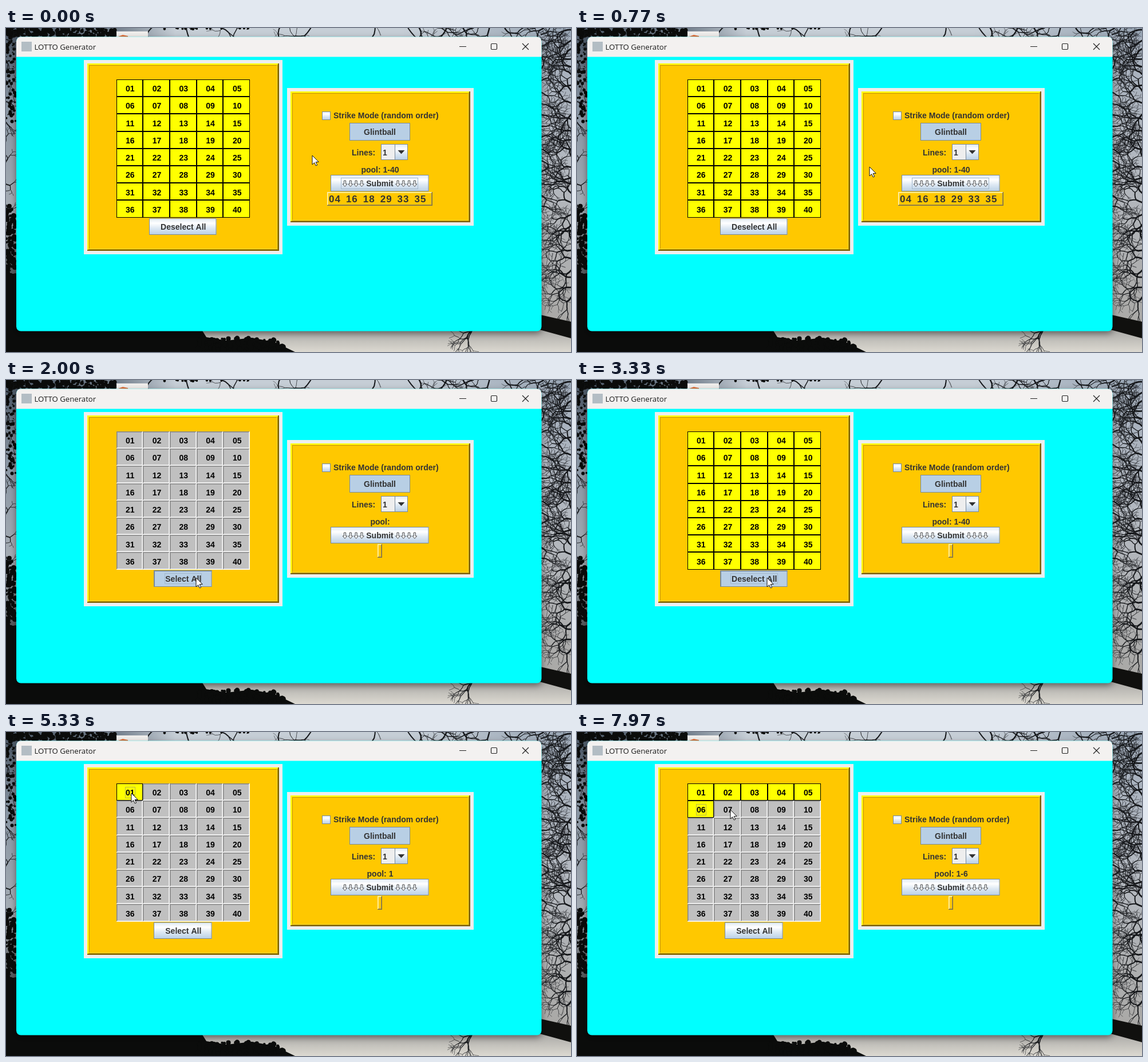
Recreate the animation shown at these times as an HTML page with a canvas. Size 987 by 567 pixels, loop 8000 ms.

```html
<!DOCTYPE html>
<html lang="en">
<head>
<meta charset="utf-8">
<title>LOTTO Generator</title>
<style>
html, body { margin: 0; width: 100%; height: 100%; overflow: hidden; background: #000; }
canvas { display: block; }
</style>
</head>
<body>
<canvas id="stage" width="987" height="567"></canvas>
<script>
const W = 987, H = 567, LOOP = 8000;
const BOLD = 'bold 14px "Liberation Sans", Arial, sans-serif';
const ORANGE = '#ffc800', BLUE = '#b8cfe5', STEEL = '#7a8a99', INK = '#333';
const screen = document.getElementById('stage').getContext('2d');
let ctx = screen;

function box(x, y, w, h, fill, stroke) {
  if (fill) { ctx.fillStyle = fill; ctx.fillRect(x, y, w, h); }
  if (stroke) { ctx.strokeStyle = stroke; ctx.lineWidth = 1; ctx.strokeRect(x + .5, y + .5, w - 1, h - 1); }
}

function text(str, x, y, align = 'center', color = INK, font = BOLD) {
  ctx.font = font;
  ctx.textAlign = align;
  ctx.fillStyle = color;
  ctx.fillText(str, x, y);
}

function path(points, fill, stroke, width = 1, close = true) {
  ctx.beginPath();
  points.forEach(([x, y]) => ctx.lineTo(x, y));
  if (close) ctx.closePath();
  if (fill) { ctx.fillStyle = fill; ctx.fill(); }
  if (stroke) { ctx.strokeStyle = stroke; ctx.lineWidth = width; ctx.stroke(); }
}

function bevel(x, y, w, h, light, dark, size = 1) {
  box(x, y, w, size, light);
  box(x, y, size, h, light);
  box(x, y + h - size, w, size, dark);
  box(x + w - size, y, size, h, dark);
}

function gradient(x, y, w, h, stops) {
  const g = ctx.createLinearGradient(x, y, x + w, y + h);
  stops.forEach(([p, c]) => g.addColorStop(p, c));
  return g;
}

const metal = (y, h) => gradient(0, y, 0, h, [[0, '#dde8f3'], [.3, '#fff'], [.6, '#dde8f3'], [1, BLUE]]);

function button(x, y, w, h, pressed) {
  box(x, y, w, h, pressed ? BLUE : metal(y, h), STEEL);
  if (pressed) { box(x, y, 2, h, STEEL); box(x, y, w, 2, STEEL); }
}

function panel(x, y, w, h) {
  box(x, y, w, h, '#eee');
  box(x + 6, y + 6, w - 12, h - 12, ORANGE);
  bevel(x + 6, y + 6, w - 12, h - 12, '#ffff00', '#7c6200', 2);
  bevel(x + 8, y + 8, w - 16, h - 16, '#ffd800', '#b28c00');
  bevel(x + 9, y + 9, w - 18, h - 18, '#c89a00', '#ffdc30');
}

// Backdrop: evening sky with seeded tree silhouettes
let seed = 11;
const rand = () => (seed = (seed * 16807) % 2147483647) / 2147483647;

function branch(x, y, angle, length, width) {
  if (width < .45) return;
  ctx.strokeStyle = '#15171a';
  ctx.lineWidth = width;
  ctx.beginPath();
  ctx.moveTo(x, y);
  for (let i = 0; i < 3; i++) {
    angle += (rand() - .5) * .9;
    x += Math.cos(angle) * length / 3;
    y += Math.sin(angle) * length / 3;
    ctx.lineTo(x, y);
  }
  ctx.stroke();
  for (const side of [-1, 1]) branch(x, y, angle + side * (.2 + rand() * .7), length * .85, width * .7);
}

function foliage(count, x, y, w, h, size) {
  ctx.fillStyle = '#0b0c0b';
  for (let i = 0; i < count; i++) {
    ctx.beginPath();
    ctx.arc(x + rand() * w, y + rand() * h, size * (.3 + rand()), 0, 7);
    ctx.fill();
  }
}

function drawBackdrop() {
  box(0, 0, W, H, gradient(0, 0, 0, H, [[0, '#a4afbd'], [.45, '#b4b9c0'], [.93, '#a9a8a5'], [1, '#dcd9d1']]));
  box(0, 0, W, 16, gradient(0, 0, W, 0, [[0, '#4d5967'], [.2, '#76828f'], [.3, '#c6ced6'], [.7, '#c6ced6'], [1, '#98a5b4']]));
  box(0, 16, 20, 414, gradient(0, 16, 0, 414, [[0, '#4d5967'], [.3, '#8794a2'], [.7, '#a3abb3'], [1, '#55595c']]));
  foliage(190, 0, 0, 192, 15, 3.5);
  foliage(70, 0, 0, 17, 170, 3);
  foliage(110, 0, 310, 17, 125, 4);
  foliage(24, 265, 0, 170, 2, 2);
  for (let i = 0; i < 9; i++) branch(260 + i * 55, -4, rand() * 3, 22, 2);
  for (let i = 0; i < 10; i++) branch(720 + i * 25, -3, rand() * 3, 16, 2.4);
  for (let i = 0; i < 30; i++) branch(991, 4 + i * 16, 2.5 + rand() * 1.4, 16, 2.8);
  for (let i = 0; i < 16; i++) branch(934, 12 + i * 20, -.7 + rand() * 1.4, 14, 2);
  for (let i = 0; i < 9; i++) branch(-1, 20 + i * 36, rand() * 2 - 1, 9, 1.8);
  for (let i = 0; i < 4; i++) branch(815, 528, 2.2 + i * .25, 17, 1.6);
  box(0, 430, 20, 137, '#0b0c0b');
  path([[0, 525], [340, 525], [350, 541], [385, 547], [430, 542], [470, 550], [505, 567], [0, 567]], '#0b0c0b');
  foliage(130, 335, 543, 155, 24, 4);
  path([[925, 500], [987, 514], [987, 543], [925, 526]], '#10100e');
  box(193, 6, 55, 12, '#f1efed');
  path([[196, 15], [204, 12], [213, 14], [213, 16]], '#e2703a');
}

function drawWindow() {
  ctx.save();
  ctx.shadowColor = 'rgba(0,0,0,.45)';
  ctx.shadowBlur = 12;
  ctx.shadowOffsetY = 4;
  ctx.beginPath();
  ctx.roundRect(18, 15.5, 917.5, 515, 8);
  ctx.fillStyle = '#0ff';
  ctx.fill();
  ctx.restore();
  ctx.beginPath();
  ctx.roundRect(18, 15.5, 917.5, 35, [8, 8, 0, 0]);
  ctx.fillStyle = '#f3f1f0';
  ctx.fill();
  box(27, 24, 18, 17, '#b3bdc4');
  text('LOTTO Generator', 49.5, 38, 'left', '#1c1c1c', '13.2px "Open Sans", "Noto Sans", sans-serif');
  path([[792, 32.5], [804, 32.5]], null, '#222', 1.2);
  ctx.beginPath();
  ctx.roundRect(847.5, 27.5, 10, 10, 1.5);
  ctx.stroke();
  path([[902, 27], [913, 38]], null, '#222', 1.2);
  path([[913, 27], [902, 38]], null, '#222', 1.2);
}

function downArrow(x, y) {
  const half = [[1.5, 0], [1.5, 6], [4, 6], [0, 10.5]];
  const mirrored = half.slice(0, 3).reverse().map(([a, b]) => [-a, b]);
  path([...half, ...mirrored].map(([a, b]) => [x + a, y + b]), '#f4f7fa', '#4c4c4c');
}

function drawControls() {
  panel(136, 56, 347, 340);
  panel(491, 105, 326, 241);
  box(552, 146, 15, 15, metal(146, 15), STEEL);
  text('Strike Mode (random order)', 572, 158, 'left');
  box(600, 166, 106, 31, BLUE, STEEL);
  text('Glintball', 653, 187);
  text('Lines:', 604, 223, 'left');
  box(655, 203, 25, 28, '#eee', STEEL);
  button(679, 203, 23, 28);
  text('1', 658, 223, 'left');
  path([[684.5, 214], [696.5, 214], [690.5, 220.5]], INK);
  button(567, 257, 171.5, 29);
  text('Submit', 653, 277);
  for (let i = 0; i < 4; i++) {
    downArrow(592 + i * 9.8, 267);
    downArrow(684.5 + i * 9.8, 267);
  }
}

function layer(draw) {
  const canvas = document.createElement('canvas');
  canvas.width = W;
  canvas.height = H;
  ctx = canvas.getContext('2d');
  draw();
  ctx = screen;
  return canvas;
}

const still = layer(() => { drawBackdrop(); drawWindow(); drawControls(); });

// Timeline: button presses [down, up], number clicks, pointer stops [time, x, y]
const presses = [[1650, 1770], [1930, 2090], [3260, 3410]];
const picks = [5250, 5650, 6080, 6560, 6930, 7560];
const pointer = [
  [0, 535, 223], [250, 535, 223], [770, 511, 243], [1500, 332, 346], [3950, 332, 346],
  [4270, 324, 324], [5050, 216, 108], [5300, 217, 107], [5550, 262, 106], [5720, 262, 106],
  [5980, 309, 105], [6150, 310, 105], [6370, 345, 105], [6480, 355, 106], [6640, 356, 106],
  [6850, 401, 107], [7020, 401, 107], [7430, 215, 136], [7650, 216, 136], [7970, 268, 136], [8000, 268, 136]
];

function pointerAt(t) {
  const i = pointer.findIndex(p => p[0] > t);
  const [t0, x0, y0] = pointer[i - 1], [t1, x1, y1] = pointer[i];
  const p = (t - t0) / (t1 - t0), e = p * p * (3 - 2 * p);
  return [x0 + (x1 - x0) * e, y0 + (y1 - y0) * e];
}

const cellX = col => Math.round(192.8 + col * 46.65);
const cellY = row => Math.round(90 + row * 30.2);

function drawCell(index, selected, focused) {
  const col = index % 5, row = Math.floor(index / 5);
  const x = cellX(col), y = cellY(row), w = cellX(col + 1) - x, h = cellY(row + 1) - y;
  if (selected) {
    box(x, y, w, h, '#ff0', '#000');
  } else {
    box(x, y, w, h, '#c0c0c0');
    bevel(x, y, w, h, '#858585', '#fff');
    bevel(x + 1, y + 1, w - 2, h - 2, '#a0a0a0', '#e4e4e4');
  }
  const cx = 216.8 + col * 46.75;
  text(String(index + 1).padStart(2, '0'), cx, 111 + Math.round(row * 30.25), 'center', '#000');
  if (focused) box(Math.round(cx) - 9, y + 6, 18, 20, null, '#b9b94a');
}

function drawToggle(all, pressed, focused) {
  const [label, x, w, textWidth] = all ? ['Deselect All', 250, 117.5, 80] : ['Select All', 258, 101.5, 62];
  button(x, 333, w, 29, pressed);
  if (focused) box(Math.round(309 - textWidth / 2) - 1, 338, textWidth + 3, 19, null, '#a3b8cc');
  text(label, 309.8, 353.3);
}

function drawResult(filled) {
  const [x, w] = filled ? [561, 184] : [649, 8];
  box(x, 287, w, 24, ORANGE);
  bevel(x, 287, w, 24, '#fff2b0', '#7d7048');
  bevel(x + 1, 288, w - 2, 22, '#ffe680', '#a08a48');
  if (!filled) return;
  ctx.letterSpacing = '1px';
  ['04', '16', '18', '29', '33', '35'].forEach((n, i) =>
    text(n, 564 + i * 29.9, 305, 'left', INK, 'bold 17px "Liberation Sans", Arial, sans-serif'));
  ctx.letterSpacing = '0px';
}

function drawPointer(x, y) {
  const shape = [[0, 0], [0, 16], [3.7, 12.6], [6.3, 18], [8.7, 17], [6.2, 11.6], [11.2, 11.4]];
  path(shape.map(([a, b]) => [x + a, y + b]), '#fff', '#111');
}

function render(t) {
  const toggles = presses.filter(p => t >= p[1]).length;
  const pressed = presses.some(([down, up]) => t >= down && t < up);
  const touched = t >= presses[0][0];
  const all = toggles % 2 === 0;
  const picked = picks.filter(p => t >= p).length;
  const count = all ? 40 : picked;

  ctx.drawImage(still, 0, 0);
  for (let i = 0; i < 40; i++) drawCell(i, i < count, picked > 0 && i === picked - 1);
  drawToggle(all, pressed, touched && !picked);
  if (!touched) box(585, 262, 135, 20, null, '#a3b8cc');
  text('pool:' + (count > 1 ? ' 1-' + count : count ? ' 1' : ''), 653.5, 253);
  drawResult(toggles === 0);
  drawPointer(...pointerAt(t));
}

function frame(now) {
  render(now % LOOP);
  requestAnimationFrame(frame);
}
render(0);
requestAnimationFrame(frame);
</script>
</body>
</html>
```
